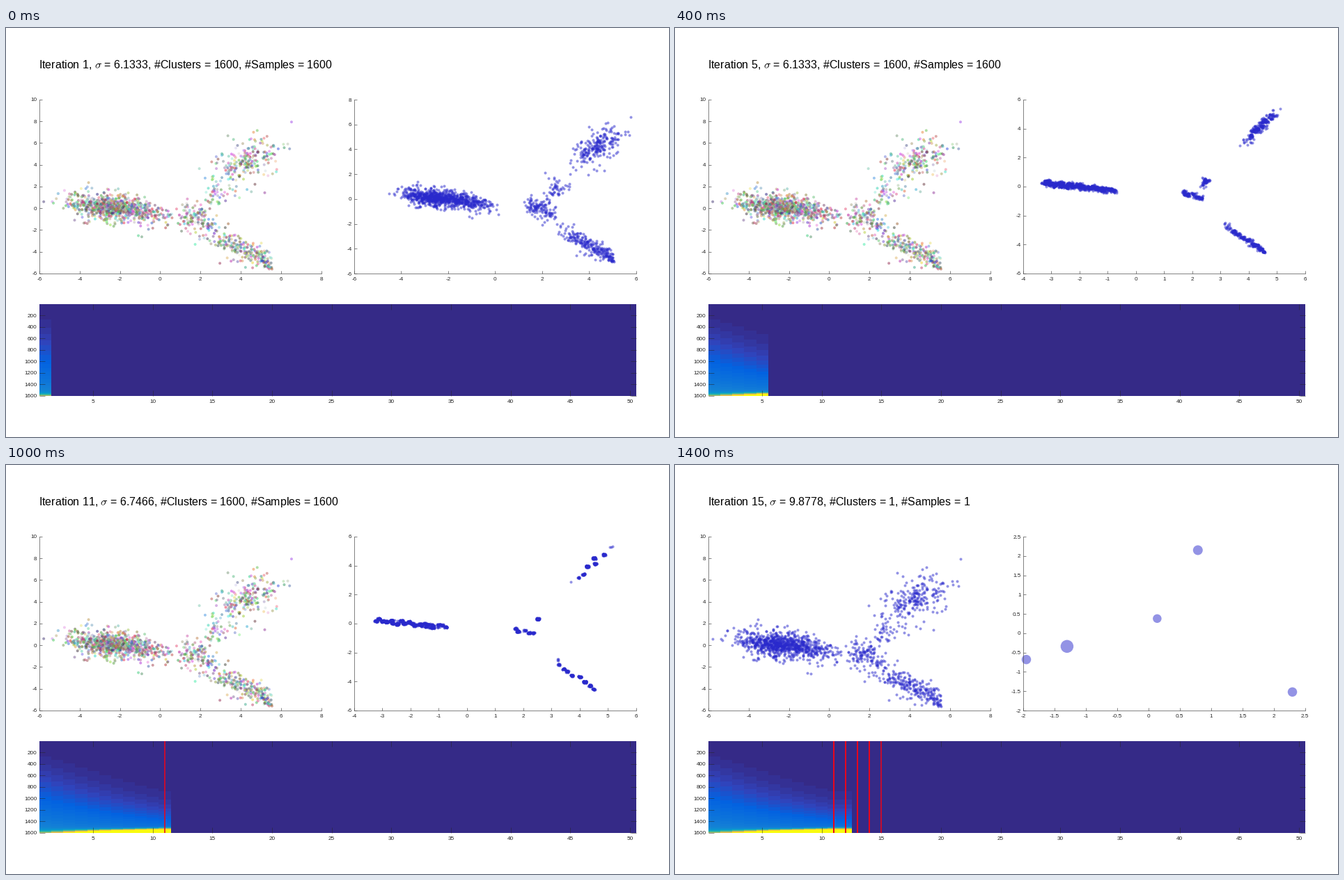
Write a matplotlib script that moves like this. It is 952 px wide and 588 px high and loops after 1.5 s.

```python
import numpy as np
import matplotlib.pyplot as plt
from matplotlib.animation import FuncAnimation
from matplotlib.colors import LinearSegmentedColormap

W, H, DPI = 952, 588, 100
PX = 72 / DPI
STEPS, COLS, ROWS = 15, 50, 1600
INK, EDGE = "#262626", "#505050"
BLUE, RED, GREEN = (.16, .16, .8), (.8, .16, .16), (.16, .8, .16)
NAVY, PINK = (.16, .16, .3), (.78, .2, .78)

plt.rcParams.update({
    "font.family": "Liberation Sans",
    "mathtext.fontset": "cm",
    "axes.unicode_minus": False,
    "axes.linewidth": .7 * PX,
    "axes.edgecolor": EDGE,
})
rng = np.random.default_rng(7)


# ---- sample data -------------------------------------------------------

def blob(n, cx, cy, sx, sy, slope):
    """Sloping cloud with a dense core and a loose fringe."""
    x = cx + sx * rng.normal(size=n)
    y = cy + slope * (x - cx) + sy * rng.normal(size=n) * rng.uniform(.5, 1.4, n)
    return np.column_stack([x, y])


def tail(n):
    """Branch running down to the lower right, denser at its end."""
    x = 2.1 + 3.5 * rng.beta(1.9, 1.3, n)
    y = -2.2 - .87 * (x - 2.2) + rng.normal(0, .62, n)
    return np.column_stack([x, np.abs(y + 5.6) - 5.6])


def condense(pts, start, end, gain, n):
    """Return each point's place on a ridge and the hub it gathers at."""
    a, b = np.array(start), np.array(end)
    length = np.hypot(*(b - a))
    axis = (b - a) / length
    normal = np.array([-axis[1], axis[0]])

    t = .5 + .5 * np.tanh(2 * gain * ((pts - (a + b) / 2) @ axis) / length)
    line = a + t[:, None] * (b - a)
    off = np.clip(.15 * ((pts - line) @ normal), -.2, .2)
    ridge = line + off[:, None] * normal

    th = (np.arange(n) + rng.uniform(.2, .8, n)) / n
    hubs = a + th[:, None] * (b - a) + rng.uniform(-.13, .13, (n, 1)) * normal
    nearest = np.linalg.norm(ridge[:, None] - hubs, axis=2).argmin(1)
    return ridge, hubs[nearest] + rng.uniform(-.055, .055, pts.shape)


# ridge start, ridge end, contraction, number of hubs
BODY = (-3.3, .27), (-.7, -.25), .8, 20
HUB = (1.65, -.35), (2.4, -.7), .6, 5
BRIDGE = (2.25, -.1), (2.5, .5), .2, 1
UPPER = (3.7, 2.65), (5.05, 5.4), .55, 8
LOWER = (3, -2.35), (4.65, -4.7), .65, 9

# samples, ridge, colour among five clusters, colour among two
groups = [
    (blob(660, -2.6, .12, .98, .6, -.16), BODY, NAVY, BLUE),
    (blob(240, -1.1, -.25, .8, .58, -.25), BODY, BLUE, BLUE),
    (blob(115, 1.85, -.95, .48, .65, -.5), HUB, GREEN, RED),
    (blob(55, 2.6, .8, .55, .9, 1), BRIDGE, GREEN, RED),
    (blob(220, 4.3, 4.4, .85, 1.1, .75), UPPER, PINK, RED),
    (tail(235), LOWER, RED, RED),
]

parts = [(pts, *condense(pts, *shape), np.tile(c5, (len(pts), 1)), np.tile(c2, (len(pts), 1)))
         for pts, shape, c5, c2 in groups]
stacked = [np.vstack(part) for part in zip(*parts)]
order = rng.permutation(len(stacked[0]))
points, ridge, hub, five, two = (v[order] for v in stacked)
many = rng.uniform(.15, .95, (len(points), 3))

# x, y and diameter in pixels
merged = np.array([(-1.95, -.68, 13.5), (-1.3, -.34, 18.5), (.14, .38, 12.5),
                   (.79, 2.15, 14), (2.3, -1.52, 13.5)])


def samples(k):
    """Points shrink onto their ridge first, then along it to their hub."""
    spread = .5 * .53 ** (k - 1)
    clump = 1 / (1 + np.exp((k - 6.5) / 1.6))
    return hub + clump * (ridge - hub) + spread * (points - ridge)


# ---- spectrum ----------------------------------------------------------

parula = LinearSegmentedColormap.from_list("parula64", [
    (0, "#352a87"), (.06, "#3243ba"), (.127, "#0363e1"), (.25, "#1480d6"),
    (.38, "#079ccf"), (.5, "#31b89e"), (.76, "#d1bb59"), (.89, "#ffc337"),
    (1, "#f9fb0e")], N=64)


def spectrum(k):
    j = min(k, 11) - 1
    f = np.linspace(0, 1, ROWS)
    body = .28 * f ** (1.6 + .2 * j + .012 * j * j)
    peak = min(.5 + .11 * j, 1)
    width, power = .021 + .003 * j, min(1 + .35 * j, 4)
    return np.clip(body + peak * np.exp(-((1 - f) / width) ** power), 0, 1)


full = np.zeros((ROWS, COLS))
for k in range(1, 13):
    full[:, k - 1] = spectrum(k)


# ---- stage -------------------------------------------------------------

fig = plt.figure(figsize=(W / DPI, H / DPI), dpi=DPI, facecolor="white")


def panel(x0, y0, x1, y1, tick):
    ax = fig.add_axes([x0 / W, 1 - y1 / H, (x1 - x0) / W, (y1 - y0) / H])
    ax.tick_params(direction="in", length=tick * PX, width=.7 * PX, color=EDGE,
                   labelcolor=INK, labelsize=8.1 * PX)
    ax.tick_params(axis="x", pad=5 * PX)
    ax.tick_params(axis="y", pad=3.5 * PX)
    return ax


def ticks(ax, xs, ys):
    ax.set_xlim(xs[0], xs[-1])
    ax.set_ylim(ys[0], ys[-1])
    ax.set_xticks(xs, [f"{v:g}" for v in xs])
    ax.set_yticks(ys, [f"{v:g}" for v in ys])


def dots(ax, pts):
    ax.spines[["top", "right"]].set_visible(False)
    return ax.scatter(pts[:, 0], pts[:, 1], s=(4 * PX) ** 2, color=[BLUE],
                      alpha=.5, linewidths=0, clip_on=False)


left = panel(48, 103, 452.5, 353, 4)
right = panel(500, 103, 904.5, 353, 4)
heat = panel(48, 397, 904.5, 529, 8)

left_dots = dots(left, points)
right_dots = dots(right, points)
ticks(left, range(-6, 9, 2), range(-6, 11, 2))

image = heat.imshow(full, cmap=parula, vmin=0, vmax=1, aspect="auto",
                    interpolation="nearest", extent=(.5, COLS + .5, ROWS + .5, .5))
heat.spines[:].set_visible(False)
heat.tick_params(top=True, right=True, color=INK, width=.5 * PX)
heat.set_xticks(range(5, COLS + 1, 5))
heat.set_yticks(range(200, ROWS + 1, 200))
marks = [heat.axvline(k, color="#e8061c", lw=2 * PX) for k in range(11, STEPS + 1)]

title = fig.text(47.3 / W, 1 - 58 / H, "", size=16 * PX, color="black")


def draw(i):
    k = i + 1
    sigma = 6.13331 * 1.1 ** max(0, k - 10)
    count = {13: 5, 14: 2, 15: 1}.get(k, ROWS)
    title.set_text(rf"Iteration {k}, $\sigma$ = {sigma:.4f}, "
                   f"#Clusters = {count}, #Samples = {count}")
    left_dots.set_facecolor({5: five, 2: two, 1: [BLUE]}.get(count, many))

    if count == ROWS:
        right_dots.set_offsets(samples(k))
        right_dots.set_sizes([(4 * PX) ** 2])
        xs = range(-6, 7, 2) if k == 1 else range(-4, 7)
        ys = range(-6, 9 if k <= 2 else 7, 2)
    else:
        right_dots.set_offsets(merged[:, :2])
        right_dots.set_sizes((merged[:, 2] * PX) ** 2)
        xs = ys = np.arange(-2, 2.6, .5)
    ticks(right, xs, ys)

    image.set_data(np.where(np.arange(COLS) < k, full, 0))
    for at, mark in enumerate(marks, 11):
        mark.set_visible(at <= k)
        mark.set_alpha(.8 if at == k else 1)
    return left_dots, right_dots, image, title


anim = FuncAnimation(fig, draw, frames=STEPS, interval=100, repeat=True,
                     repeat_delay=0, blit=False)
plt.show()
```
